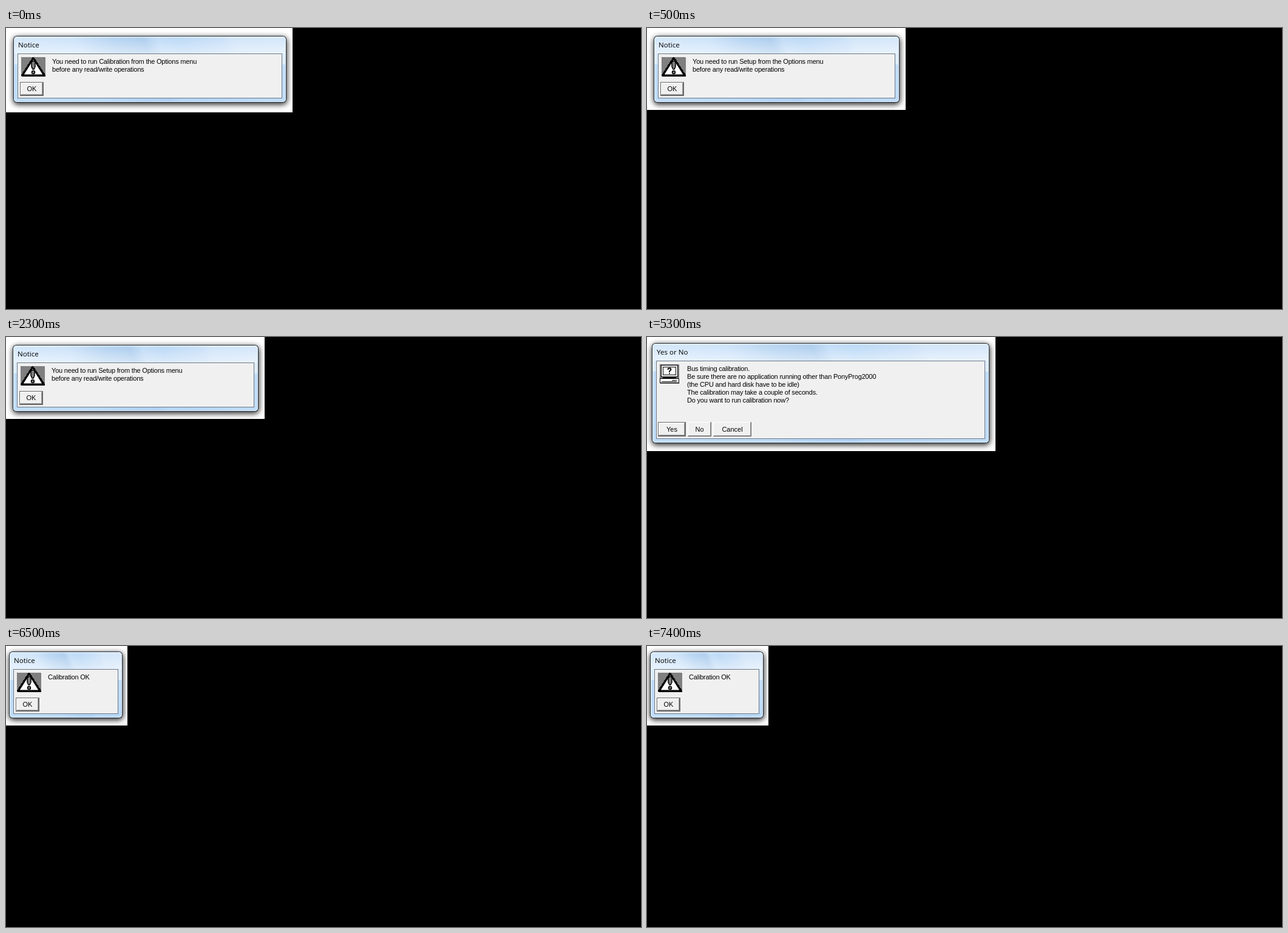
An HTML page that plays this animation: 1046 px wide and 463 px high, repeating every 8000 ms.

```html
<!DOCTYPE html>
<html lang="en">
<head>
<meta charset="utf-8">
<title>Calibration dialogs</title>
<style>
  html, body { margin: 0; width: 100%; height: 100%; overflow: hidden; background: #000; }
  svg { display: block; width: 1046px; height: 463px; }
  text { fill: #000; white-space: pre; font-kerning: none; }
  .title { font: 11.6px "Open Sans", "Noto Sans", sans-serif; }
  .body { font: 11px "Liberation Sans", Arial, sans-serif; letter-spacing: -0.2px; }
  .label { font: 11px "Liberation Sans", Arial, sans-serif; text-anchor: middle; }
  .crisp { shape-rendering: crispEdges; }
</style>
</head>
<body>
<svg id="stage" viewBox="0 0 1046 463" xmlns="http://www.w3.org/2000/svg">
  <defs>
    <pattern id="dither" width="2" height="2" patternUnits="userSpaceOnUse">
      <rect width="2" height="2" fill="#fff"/>
      <path d="M0 0h1v1h-1zM1 1h1v1h-1z" fill="#000" class="crisp"/>
    </pattern>
    <linearGradient id="side" x1="0" y1="0" x2="0" y2="1">
      <stop offset="0" stop-color="#fff" stop-opacity=".25"/>
      <stop offset=".2" stop-color="#fff" stop-opacity=".08"/>
      <stop offset="1" stop-color="#fff" stop-opacity=".5"/>
    </linearGradient>
    <filter id="blur" x="-30%" y="-40%" width="160%" height="180%">
      <feGaussianBlur stdDeviation="5"/>
    </filter>
  </defs>
</svg>
<script>
const LOOP = 8000;
const stage = document.getElementById('stage');

const rect = (x, y, w, h, fill, extra = '') =>
  `<rect x="${x}" y="${y}" width="${w}" height="${h}" fill="${fill}" ${extra}/>`;
const frame = (x, y, w, h, color, extra = '') =>
  rect(x + .5, y + .5, w - 1, h - 1, 'none', `stroke="${color}" ${extra}`);
const text = (x, y, kind, s) => `<text x="${x}" y="${y}" class="${kind}">${s}</text>`;

function button({ x, y, w, h, label, main }) {
  const edge = main ? 1 : 0;
  const l = x + edge, t = y + edge, r = x + w - edge, b = y + h - edge;
  return '<g class="crisp">' +
    rect(x, y, w, h, main ? '#696969' : '#f0f0f0') +
    rect(l, t, r - l, b - t, '#696969') +
    rect(l, t, r - l - 1, b - t - 1, '#fff') +
    rect(l + 1, t + 1, r - l - 2, b - t - 2, '#a0a0a0') +
    rect(l + 1, t + 1, r - l - 3, b - t - 3, '#f0f0f0') +
    '</g>' + text(x + w / 2, y + h / 2 + 3.5, 'label', label);
}

// 40 x 32 caution sign
const warning = (x, y) => `<g transform="translate(${x} ${y})">` +
  rect(0, 0, 40, 32, 'url(#dither)') +
  `<path d="M20 2L38 30H2Z" fill="#fff" stroke="#000" stroke-width="4" stroke-linejoin="round"/>
   <path d="M20 2.5L37 29.5H3Z" fill="#fff" stroke="#000" stroke-width="2" stroke-linejoin="round"/>
   <path d="M18.5 6.5h3l1.500 2v7l-2 4.500h-2l-2-4.500v-7z" fill="url(#dither)" stroke="#000" stroke-width="1.500"/>
   <circle cx="20" cy="25" r="2.500" fill="url(#dither)" stroke="#000" stroke-width="1.500"/></g>`;

// 32 x 32 computer with a question mark
const computer = (x, y) => `<g transform="translate(${x} ${y})">` +
  '<g class="crisp">' + rect(0, 0, 32, 32, 'url(#dither)') +
  rect(2, 1, 28, 20, '#000', 'rx="1"') + rect(3, 2, 26, 18, '#fff') +
  rect(5, 4, 22, 14, '#000') + rect(6, 5, 20, 12, '#fff') +
  rect(5, 21, 22, 2, '#000') +
  rect(0, 23, 32, 8, '#000', 'rx="1"') + rect(1, 24, 30, 6, '#fff') +
  rect(20, 26, 8, 1, '#000') + rect(3, 28, 25, 1, '#000') + '</g>' +
  `<path d="M13.500 9V8q0-1.500 2.500-1.500T18.500 8.500Q18.500 10 16 11V13M16 14.200V16"
    fill="none" stroke="#000" stroke-width="1.800"/></g>`;

function dialog(d, i) {
  const { x, y, w, h } = d;
  const bands = [[0, '#d2e6fb'], [.22, '#cbe2fa'], [.36, '#b3d2f1'], [.47, '#a9cbed'],
    [.52, '#bfdbf7'], [.6, '#b9d8f6'], [.76, '#c8dff8'], [.8, '#d0e4f9'], [1, '#d3e6fa']];
  const stops = bands.map(([o, c]) => `<stop offset="${o}" stop-color="${c}"/>`).join('');
  return `<g class="scene" display="none">
    <defs>
      <clipPath id="panel${i}"><rect width="${d.panel[0]}" height="${d.panel[1]}"/></clipPath>
      <clipPath id="win${i}"><rect x="1" y="1" width="${w - 2}" height="${h - 2}" rx="5"/></clipPath>
      <linearGradient id="glass${i}" gradientUnits="userSpaceOnUse" x1="0" y1="0" x2="${w}" y2="0"
        gradientTransform="skewX(24)">${stops}</linearGradient>
    </defs>
    <g clip-path="url(#panel${i})">` +
    rect(0, 0, ...d.panel, '#fff') +
    `<g transform="translate(${x} ${y})">` +
    rect(0, 2, w + 1, h + 1, '#000', 'rx="7" opacity=".85" filter="url(#blur)"') +
    rect(0, 0, w, h, '#1f2a36', 'rx="6"') +
    `<g clip-path="url(#win${i})">` +
    rect(0, 0, w, h, `url(#glass${i})`) +
    rect(0, 0, w, 29, 'url(#side)') +
    rect(0, 29, 7, 18, '#e3f0fd', 'opacity=".7"') +
    rect(w - 7, 29, 7, 18, '#e3f0fd', 'opacity=".7"') +
    rect(0, 47, w, h - 47, '#b4d8fb', 'opacity=".6"') + '</g>' +
    frame(1, 1, w - 2, h - 2, '#f4faff', 'rx="5" opacity=".8"') +
    '<g class="crisp">' + rect(7, 29, w - 14, h - 36, '#f0f0f0') +
    frame(7, 29, w - 14, h - 36, '#6b7885') + '</g>' +
    text(8, 19, 'title', d.title) +
    d.icon +
    d.lines.map((s, n) => text(d.textX, 46 + 13 * n, 'body', s)).join('') +
    d.buttons.map(button).join('') +
    '</g></g></g>';
}

const notice = (start, panel, x, y, w, lines) => ({
  start, panel, x, y, w, h: 110, title: 'Notice', lines, textX: 64,
  icon: warning(13, 35),
  buttons: [{ x: 11, y: 76, w: 39, h: 23, label: 'OK', main: true }]
});
const needRun = task =>
  [`You need to run ${task} from the Options menu`, 'before any read/write operations'];

const scenes = [
  notice(0, [472, 139], 12, 13, 450, needRun('Calibration')),
  notice(500, [426, 135], 11, 13, 405, needRun('Setup')),
  {
    start: 3500, panel: [574, 188], x: 8, y: 10, w: 556, h: 165, title: 'Yes or No', textX: 58,
    icon: computer(13, 35),
    lines: [
      'Bus timing calibration.',
      'Be sure there are no application running other than PonyProg2000',
      '(the CPU and hard disk have to be idle)',
      'The calibration may take a couple of seconds.',
      'Do you want to run calibration now?'
    ],
    buttons: [
      { x: 10, y: 130, w: 46, h: 24, label: 'Yes', main: true },
      { x: 59, y: 130, w: 39, h: 24, label: 'No' },
      { x: 101, y: 130, w: 63, h: 24, label: 'Cancel' }
    ]
  },
  notice(6500, [200, 131], 5, 9, 187, ['Calibration OK'])
];

stage.insertAdjacentHTML('beforeend', rect(0, 0, 1046, 463, '#000') + scenes.map(dialog).join(''));
const groups = [...stage.querySelectorAll('.scene')];

function draw(ms) {
  const current = scenes.filter(s => s.start <= ms).length - 1;
  groups.forEach((g, i) => g.setAttribute('display', i === current ? 'inline' : 'none'));
}

const began = performance.now();
function tick() {
  draw((performance.now() - began) % LOOP);
  requestAnimationFrame(tick);
}
tick();
</script>
</body>
</html>
```
